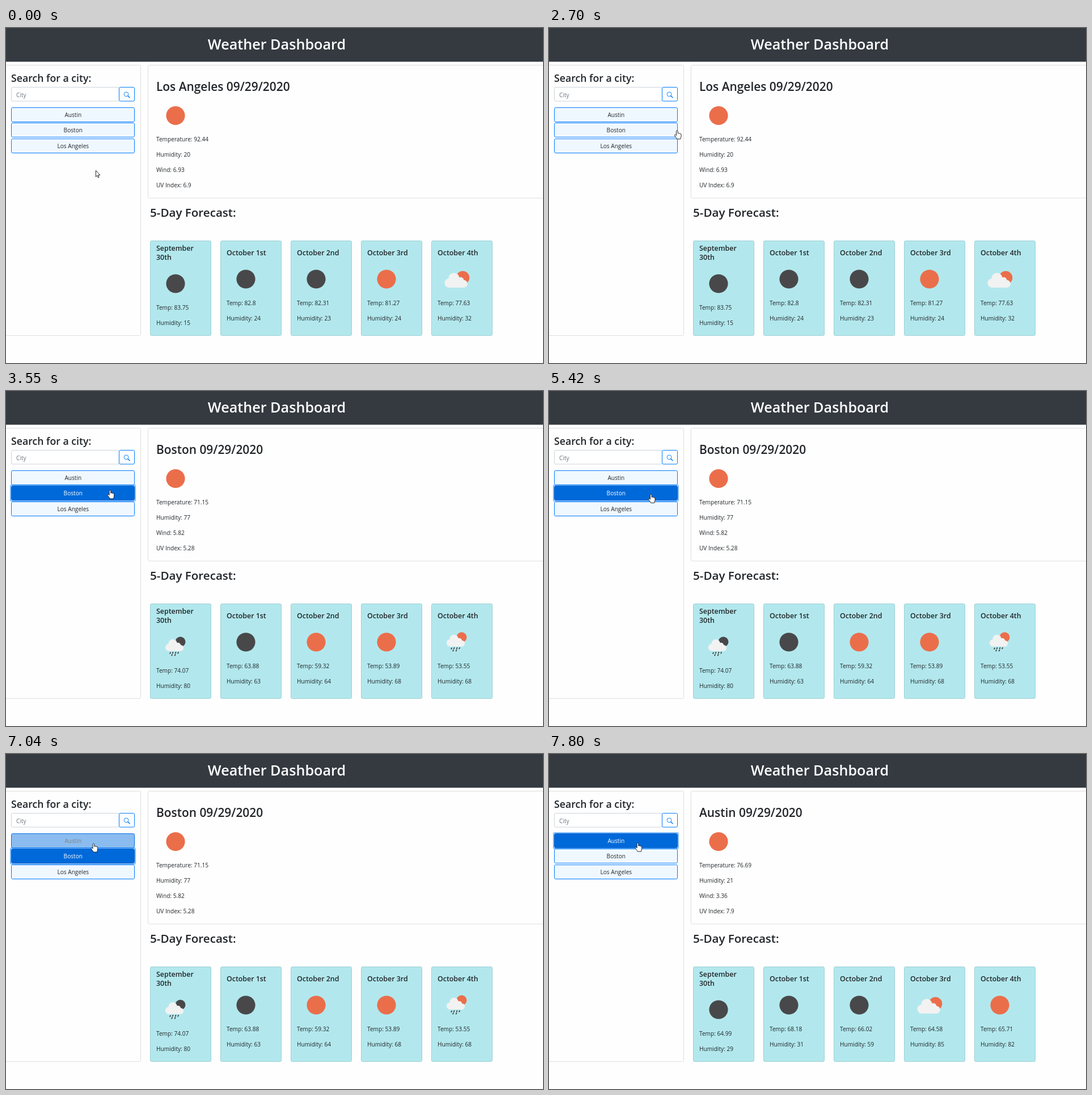
These frames come from a looping animation (947 px wide and 591 px high, 8 s). An HTML page:

```html
<!DOCTYPE html>
<html lang="en">
<head>
<meta charset="utf-8">
<title>Weather Dashboard</title>
<style>
  html, body { margin: 0; width: 100%; height: 100%; overflow: hidden; background: #fefefe; }
  svg { display: block; font: 10.15px "Open Sans", "Noto Sans", sans-serif; fill: #212529; }
  .bold { font-weight: 600; }
  .mid { text-anchor: middle; }
</style>
</head>
<body>
<svg id="stage" width="947" height="591" viewBox="0 0 947 591"></svg>
<script>
const LOOP = 8000, FADE = 150;
const SUN = '#eb6e4b', DARK = '#48484a', CLOUD = '#f2f2f2';
const DAYS = ['September', 'October 1st', 'October 2nd', 'October 3rd', 'October 4th'];

// icons: s sun, d dark disc, c cloudy sun, r rain over dark disc, R rain over sun
const CITIES = [
  { name: 'Los Angeles', now: ['92.44', 20, '6.93', '6.9'], icons: 'dddsc',
    temp: ['83.75', '82.8', '82.31', '81.27', '77.63'], hum: [15, 24, 23, 24, 32] },
  { name: 'Boston', now: ['71.15', 77, '5.82', '5.28'], icons: 'rdssR',
    temp: ['74.07', '63.88', '59.32', '53.89', '53.55'], hum: [80, 63, 64, 68, 68] },
  { name: 'Austin', now: ['76.69', 21, '3.36', '7.9'], icons: 'dddcs',
    temp: ['64.99', '68.18', '66.02', '64.58', '65.71'], hum: [29, 31, 59, 85, 82] },
];

// Pointer moves: start, end, steps, control point, end point
const MOVES = [
  [0, 0, 1, 158, 251, 158, 251],
  [310, 540, 4, 155, 248, 152, 246],
  [990, 1150, 3, 153, 245, 152, 245],
  [1550, 2140, 9, 225, 245, 243, 184],
  [2470, 2930, 7, 246, 183, 186, 176],
  [3160, 3400, 4, 185, 175, 183.5, 175],
  [3550, 3550, 1, 183.5, 175, 183.5, 175],
  [5420, 5720, 5, 174, 194, 167.5, 208],
  [6810, 7038, 4, 158, 176, 154.5, 158],
  [7114, 7570, 7, 154, 158, 153.5, 158],
  [7720, 7800, 2, 155, 157, 156.5, 157],
];

const text = (x, y, s, extra = '') => `<text x="${x}" y="${y}" ${extra}>${s}</text>`;
const head = (x, y, s, size, extra = '') => text(x, y, s, `class="bold" font-size="${size}" ${extra}`);
const box = (x, y, w, h, fill, stroke, extra = '') =>
  `<rect x="${x}" y="${y}" width="${w}" height="${h}" rx="2.2" fill="${fill}" stroke="${stroke}" ${extra}/>`;
const disc = (x, y, r, fill) => `<circle cx="${x}" cy="${y}" r="${r}" fill="${fill}"/>`;
const mix = (a, b, p) => `rgb(${a.map((v, i) => Math.round(v + (b[i] - v) * p))})`;

const cloud = disc(-13.5, 7, 8, CLOUD) + disc(-5, -1.5, 9.5, CLOUD) + disc(6.5, 2.5, 6, CLOUD) +
  disc(12, 8.2, 6.8, CLOUD) + `<path d="M-13.5 4H12V15H-13.5Z" fill="${CLOUD}"/>`;
const rain = `<path d="M-4.5 10l-.8 1.6M.5 10l-.8 1.6M5 10l-.8 1.6M-9 10.5l-.8 1.6M-6 14l-.8 1.6M-.5 14l-.8 1.6"
  stroke="${DARK}" stroke-width="1.9" stroke-linecap="round"/>`;

function icon(kind, x, y) {
  const art = {
    s: disc(0, 0, 16.6, SUN),
    d: disc(0, 0, 16.6, DARK),
    c: disc(10.5, -2.5, 11.8, SUN) + cloud,
    r: disc(8.5, -8.5, 9, DARK),
    R: disc(8.5, -8.5, 9, SUN),
  }[kind];
  const wet = /r/i.test(kind) ? `<g transform="translate(-.8 -4.2) scale(.8)">${cloud}</g>${rain}` : '';
  return `<g transform="translate(${x} ${y})">${art}${wet}</g>`;
}

function button(y, label, on, ring) {
  const halo = ring ? box(8, y - 1.5, 220, 28, 'none', '#007bff', `stroke-width="2" opacity="${ring / 2}"`) : '';
  return box(9.5, y, 217, 25, mix([240, 248, 255], [0, 105, 217], on),
    mix([0, 123, 255], [0, 98, 204], on)) + halo +
    text(118.3, y + 16.8, label, `class="mid" fill="${mix([33, 37, 41], [255, 255, 255], on)}"`);
}

const panels = '<path d="M0 0H947V59.5H0Z" fill="#343a40"/>' +
  head(477.5, 38, 'Weather Dashboard', 25.2, 'style="fill:#fff;text-anchor:middle"') +
  box(-5, 65.5, 242.5, 477, '#fefefe', '#dfdfdf') +
  box(250.5, 65.5, 710, 234.5, '#fefefe', '#dfdfdf') +
  head(9, 95, 'Search for a city:', 17.7) +
  box(9.5, 104.5, 190, 24.5, '#fff', '#ced4da') +
  text(18, 121.5, 'City', 'fill="#6c757d"') +
  box(199.5, 104.5, 27, 24.5, '#fefefe', '#007bff') +
  '<path d="M215 119.8l3 3" stroke="#007bff" stroke-width="1.5" stroke-linecap="round"/>' +
  '<circle cx="212" cy="116.8" r="3.9" fill="none" stroke="#007bff" stroke-width=".9"/>' +
  head(254, 333, '5-Day Forecast:', 20.6);

function current(city) {
  const labels = ['Temperature', 'Humidity', 'Wind', 'UV Index'];
  return head(265, 111, city.name + ' 09/29/2020', 20.9) + icon('s', 299, 154.5) +
    labels.map((l, i) => text(265, 200 + i * 27, `${l}: ${city.now[i]}`)).join('');
}

function forecast(city) {
  return DAYS.map((day, i) => {
    const x = 265 + i * 124, drop = i ? 0 : 8;
    return box(x - 10.5, 375.5, 107, 167, '#b2e8ed', '#9fcfd4') +
      head(x, 401 - drop, day, 12.4) + (i ? '' : head(x, 409, '30th', 12.4)) +
      icon(city.icons[i], x + 34, 443 + drop) +
      text(x, 489 + drop, 'Temp: ' + city.temp[i]) +
      text(x, 516 + drop, 'Humidity: ' + city.hum[i]);
  }).join('');
}

function pointer(x, y) {
  const hand = x < 227.5 && y < 221 && y > 140;
  const d = hand
    ? 'M-1.4 8V1.3C-1.4-.3 1.3-.3 1.3 1.3V5.2C1.5 4.1 3.4 4.2 3.6 5.5C4 4.6 5.5 4.8 5.7 6.1C6.2 5.3 7.2 5.7 7.2 6.9V10C7.2 12 6.2 13 6 15H-.3C-.6 13-4.2 10.2-4.4 8.4C-4.4 6.8-2.6 6.8-1.4 8.8Z'
    : 'M.4.4V11.4L2.8 9.2L4.5 13L6.1 12.3L4.4 8.5H7.8Z';
  return `<path transform="translate(${x} ${y})" d="${d}" fill="#fff" stroke="#111" stroke-width=".9" stroke-linejoin="round"/>`;
}

// Latest step at time t: its moment and the pointer position
function stepAt(t) {
  const k = MOVES.findLastIndex(m => m[0] <= t);
  const [start, end, n, cx, cy, ex, ey] = MOVES[k];
  const [sx, sy] = MOVES[Math.max(k - 1, 0)].slice(5);
  const gap = (end - start) / (n - 1) || 1;
  const i = Math.min(n - 1, Math.floor((t - start) / gap + 1e-6));
  const p = (i + 1) / n;
  const curve = (a, b, c) => a * (1 - p) ** 2 + 2 * b * p * (1 - p) + c * p * p;
  return { now: start + i * gap, x: curve(sx, cx, ex), y: curve(sy, cy, ey) };
}

const stage = document.getElementById('stage');
let shown = -1;

function draw() {
  const { now, x, y } = stepAt(performance.now() % LOOP);
  if (now !== shown) {
    shown = now;
    const fade = t => Math.min(1, Math.max(0, (now - t) / FADE));
    const pick = (a, b) => CITIES[now >= b ? 2 : now >= a ? 1 : 0];
    const left = fade(7270);
    stage.innerHTML = panels +
      button(140.5, 'Austin', fade(6975), left) +
      button(167.5, 'Boston', fade(2700) - left, fade(3160) - left) +
      button(195.5, 'Los Angeles', fade(5500) - fade(6810), 0) +
      current(pick(3400, 7490)) + forecast(pick(3550, 7565)) + pointer(x, y);
  }
  requestAnimationFrame(draw);
}
draw();
</script>
</body>
</html>
```
